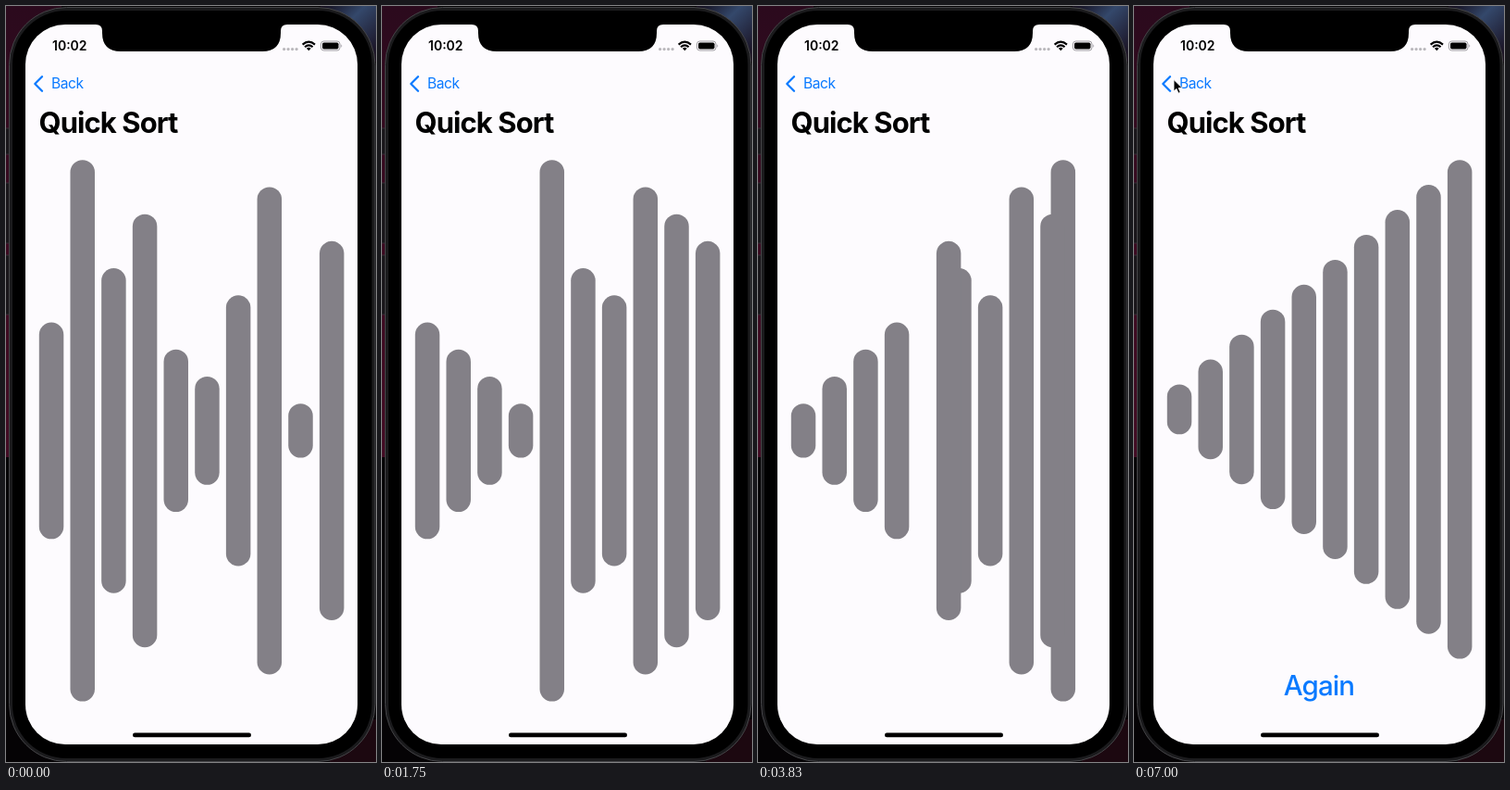
An HTML page for the animation above (7.08 s loop, 400x816 px).

```html
<!DOCTYPE html>
<html lang="en">
<head>
<meta charset="utf-8">
<title>Quick Sort</title>
<style>
  html, body { margin: 0; width: 100%; height: 100%; overflow: hidden; background: #000; }
  svg { display: block; width: 400px; height: 816px; }
  text { font-family: Inter, Roboto, sans-serif; font-optical-sizing: none; }
  .time { font-size: 14px; font-weight: 600; }
  .back { font-size: 15.6px; letter-spacing: -.03em; fill: #0a7aff; }
  .title { font-size: 31px; font-weight: 700; letter-spacing: -.03em; }
  .again { font-size: 29.5px; font-weight: 500; letter-spacing: -.03em; text-anchor: middle; fill: #0a7aff; }
  #bars rect { fill: #838087; }
</style>
</head>
<body>
<svg viewBox="0 0 400 816">
  <defs>
    <linearGradient id="wine" x2="0" y2="1">
      <stop offset="0" stop-color="#2b0a1d"/>
      <stop offset=".5" stop-color="#3a0a20"/>
      <stop offset="1" stop-color="#430c24"/>
    </linearGradient>
    <linearGradient id="sky" x2="1" y2="1">
      <stop offset="0" stop-color="#120a18"/>
      <stop offset=".4" stop-color="#34486b"/>
      <stop offset="1" stop-color="#160a18"/>
    </linearGradient>
  </defs>

  <!-- Backdrop -->
  <rect width="400" height="816" fill="#050305"/>
  <rect width="60" height="487" fill="url(#wine)"/>
  <rect x="340" width="60" height="60" fill="url(#sky)"/>
  <rect x="350" y="770" width="50" height="46" fill="#1c0810"/>

  <!-- Phone -->
  <g fill="#19161a" stroke="#39343a" stroke-width=".8">
    <rect x="-2" y="132" width="8" height="28"/>
    <rect x="-2" y="191" width="8" height="65"/>
    <rect x="-2" y="269" width="8" height="64"/>
  </g>
  <rect x="3.5" y="1.5" width="395.5" height="814" rx="62" fill="#1b1b1d" stroke="#454548"/>
  <rect x="7" y="5" width="388.5" height="807" rx="58" fill="#000"/>
  <rect x="21" y="20" width="359" height="777" rx="43" fill="#fdfbfe"/>
  <path d="M97 19.5V20Q104 20 104 27V29Q104 49 124 49H277Q297 49 297 29V27Q297 20 304 20V19.5Z"/>

  <!-- Status bar -->
  <text class="time" x="50" y="48.3">10:02</text>
  <g fill="#b9b7bb">
    <circle cx="300.6" cy="46.6" r="1.6"/>
    <circle cx="305.1" cy="46.6" r="1.6"/>
    <circle cx="309.6" cy="46.6" r="1.6"/>
    <circle cx="314.1" cy="46.6" r="1.6"/>
  </g>
  <g fill="none" stroke="#000" stroke-width="2.1">
    <path d="M320.6 41.6Q327.3 35.6 334 41.6"/>
    <path d="M323 44.2Q327.3 40.4 331.6 44.2"/>
  </g>
  <path d="M324.9 45.7Q327.3 43.9 329.7 45.7L327.3 48.2Z"/>
  <rect x="340.5" y="38" width="20.5" height="10" rx="3" fill="none" stroke="#a09ea3"/>
  <rect x="342" y="39.5" width="17.5" height="7" rx="1.7"/>
  <path d="M362.3 41.2Q364.2 43 362.3 44.8Z" fill="#a09ea3"/>

  <!-- Screen -->
  <path d="M39 76.3L31.3 84L39 91.7" fill="none" stroke="#0a7aff" stroke-width="2.3" stroke-linecap="round" stroke-linejoin="round"/>
  <text class="back" x="49" y="89.4">Back</text>
  <text class="title" x="35.5" y="137">Quick Sort</text>
  <g id="bars"></g>
  <text class="again" id="again" x="200" y="743.5" opacity="0">Again</text>
  <rect x="137" y="784.6" width="128" height="4.6" rx="2.3"/>
  <path id="cursor" d="M0 0V12.6L2.9 9.9L5 14.7L7.2 13.8L5.2 9.1H9.2Z" stroke="#fff" stroke-width=".9" visibility="hidden"/>
</svg>
<script>
  const LOOP = 7080, FPS = 12, MOVE = 350;
  const START = [4, 10, 6, 8, 3, 2, 5, 9, 1, 7];
  // [start ms, left slot, right slot]
  const SWAPS = [
    [290, 1, 4], [837, 2, 5], [1384, 3, 8], [1931, 0, 3],
    [3025, 1, 2], [3572, 4, 9], [4119, 4, 6], [5245, 7, 8]
  ];
  const SHRINK = 5800, POINTER = 6600;
  const LEFT = 35.8, PITCH = 33.68, WIDTH = 26.5, TOP = 166.2;

  const $ = id => document.getElementById(id);
  const lerp = (a, b, p) => a + (b - a) * p;

  const bars = START.map(() => {
    const bar = document.createElementNS('http://www.w3.org/2000/svg', 'rect');
    bar.setAttribute('width', WIDTH);
    bar.setAttribute('rx', WIDTH / 2);
    return $('bars').appendChild(bar);
  });

  // cubic-bezier(.42, 0, .58, 1), solved by bisection
  function ease(x) {
    if (x <= 0) return 0;
    if (x >= 1) return 1;
    let lo = 0, hi = 1, s;
    for (let i = 0; i < 20; i++) {
      s = (lo + hi) / 2;
      const u = 1 - s;
      if (1.26 * s * u * u + 1.74 * s * s * u + s * s * s < x) lo = s; else hi = s;
    }
    return s * s * (3 - 2 * s);
  }

  const progress = (t, start) => ease((t - start) / MOVE);

  function draw(t) {
    const slots = START.map((_, i) => i);
    const place = slots.slice();
    for (const [start, i, j] of SWAPS) {
      const shift = (j - i) * progress(t, start);
      place[slots[i]] += shift;
      place[slots[j]] -= shift;
      [slots[i], slots[j]] = [slots[j], slots[i]];
    }

    const shown = progress(t, SHRINK);
    const area = lerp(584.4, 538.4, shown);
    bars.forEach((bar, i) => {
      const height = area * START[i] / 10;
      bar.setAttribute('x', LEFT + PITCH * place[i]);
      bar.setAttribute('y', TOP + (area - height) / 2);
      bar.setAttribute('height', height);
    });
    $('again').setAttribute('opacity', shown);

    const p = 1 - (1 - Math.min(1, Math.max(0, (t - POINTER) / 400))) ** 2;
    $('cursor').setAttribute('visibility', t > POINTER ? 'visible' : 'hidden');
    $('cursor').setAttribute('transform', `translate(${lerp(-12, 43, p)} ${lerp(150, 79.5, p)})`);
  }

  const origin = performance.now();
  function tick() {
    const t = (performance.now() - origin) % LOOP;
    draw(Math.floor((t + 5) * FPS / 1000) * 1000 / FPS);
    requestAnimationFrame(tick);
  }
  tick();
</script>
</body>
</html>
```
